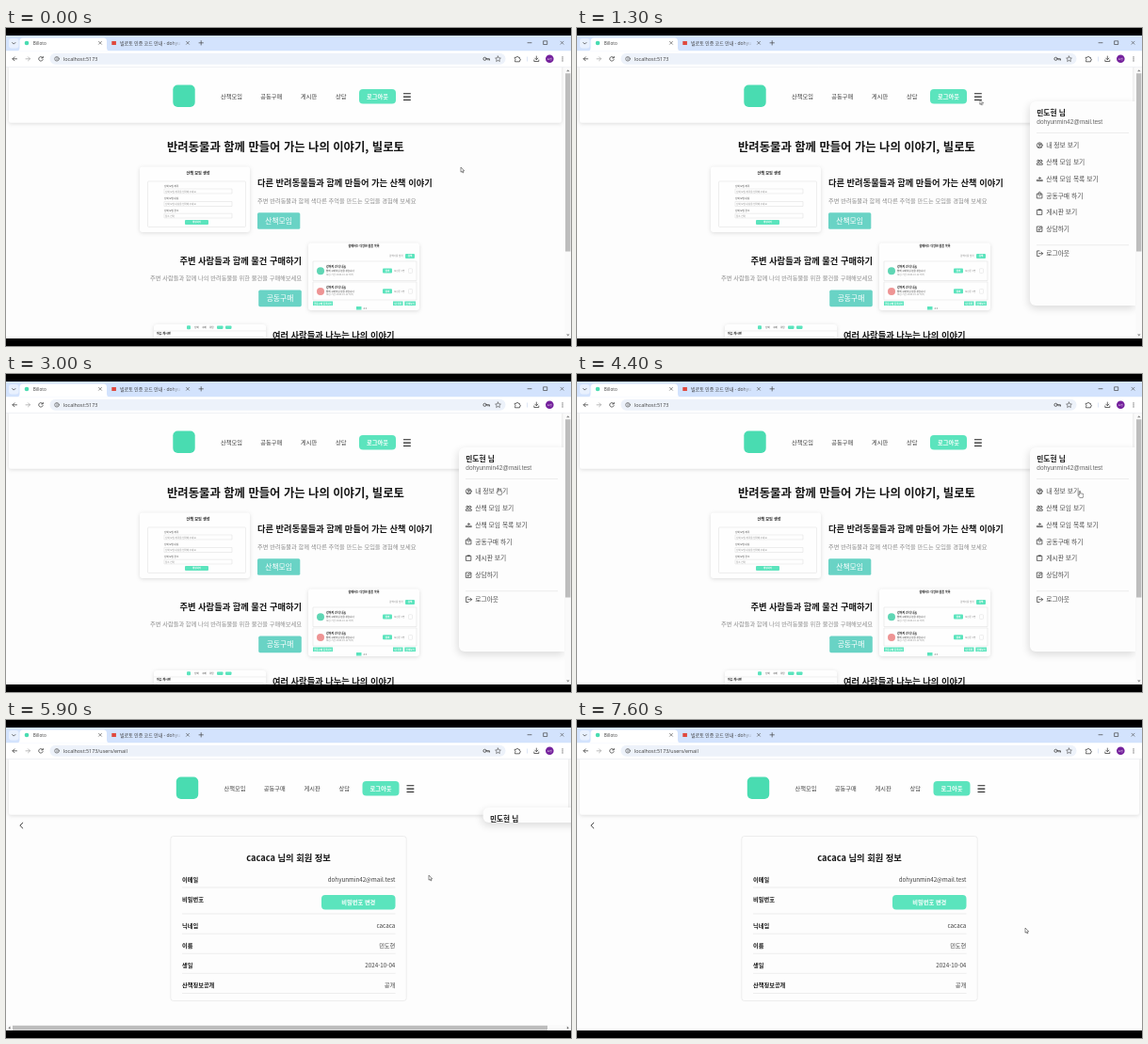
An HTML page that plays this animation: 600x338 px, repeating every 7700 ms.

```html
<!DOCTYPE html>
<html lang="ko">
<head>
<meta charset="utf-8">
<title>Billoto</title>
<style>
html, body { margin: 0; width: 100%; height: 100%; overflow: hidden; background: #000; }
#stage { position: absolute; left: 0; top: 0; width: 600px; height: 338px; overflow: hidden; background: #fdfdfd; }
svg { position: absolute; left: 0; top: 0; display: block; }
text { font: 6.22px 'Noto Sans CJK KR', 'Noto Sans CJK', sans-serif; fill: #3c3c3c; }
.b { font-weight: 700; fill: #151515; }
.h1 { font-size: 12.35px; }
.h2 { font-size: 9.25px; }
.sub { fill: #8c8c8c; }
.btn { font-size: 7.8px; fill: #fff; }
.white { fill: #fff; font-weight: 700; }
.mid { text-anchor: middle; }
.end { text-anchor: end; }
.ui, .ui text { font-family: 'Open Sans', 'Noto Sans CJK KR', sans-serif; font-size: 4.7px; }
.ui .url { font-size: 5.4px; }
.tiny text { font-size: 2.5px; }
.tiny .b { font-size: 3px; }
.line { fill: none; stroke: #444; stroke-width: .8; stroke-linecap: round; stroke-linejoin: round; }
.rule { fill: none; stroke: #e3e3e3; stroke-width: .6; }
.mint { fill: #5be4bd; }
.teal { fill: #69d3c5; }
.card { fill: #fefefe; filter: drop-shadow(0 1px 2px rgba(0,0,0,.13)); }

.home, .info, #dock, #menu, .hbar, .cursor, .arrow, .hand { animation: home 7.7s linear infinite; }
.info { animation-name: info; }
#dock { animation-name: dock; position: absolute; left: 480.8px; top: 78px; }
#menu { animation-name: menu; position: relative; width: 112.6px; height: 217px; overflow: hidden;
  background: #fdfdfd; border-radius: 6px 0 0 6px; box-shadow: -1px 3px 9px rgba(0,0,0,.14); }
#menu .item { font-size: 6.78px; fill: #4a4a4a; }
#menu .mail { font: 6.5px 'Liberation Sans', Arial, sans-serif; fill: #666; }
.hbar { animation-name: hbar; }
.cursor { animation-name: move; }
.arrow { animation-name: arrow; }
.hand { animation-name: hand; }

@keyframes home { 0%, 63.5% { opacity: 1 } 63.51%, 100% { opacity: 0 } }
@keyframes info { 0%, 63.5% { opacity: 0 } 63.51%, 100% { opacity: 1 } }
@keyframes dock { 0%, 63.5% { transform: none } 63.51%, 100% { transform: translateX(6.6px) } }
@keyframes menu {
  0%, 12.9% { opacity: 0; height: 8px; transform: translate(20px, 16px) }
  12.91% { opacity: 1; height: 8px; transform: translate(20px, 16px); animation-timing-function: ease-out }
  16.6%, 73.8% { opacity: 1; height: 217px; transform: none; animation-timing-function: ease-in-out }
  76.6% { opacity: 1; height: 16.5px; transform: translate(19px, 15px) }
  77.5% { opacity: 1; height: 6px; transform: translate(20px, 16px) }
  77.51%, 100% { opacity: 0; height: 6px; transform: translate(20px, 16px) }
}
@keyframes hbar {
  0%, 12.9% { opacity: 0 } 12.91%, 16.5% { opacity: 1 } 16.51%, 73.9% { opacity: 0 }
  73.91%, 77.8% { opacity: 1 } 77.81%, 100% { opacity: 0 }
}
@keyframes move {
  0% { transform: translate(483px, 148px); animation-timing-function: ease-in-out }
  11.5%, 20.5% { transform: translate(427.5px, 76px); animation-timing-function: ease-in-out }
  35%, 42% { transform: translate(523px, 121px); animation-timing-function: ease-in-out }
  54%, 58% { transform: translate(534px, 124px) }
  63%, 66% { transform: translate(531px, 124px); animation-timing-function: ease-in-out }
  72.5%, 79% { transform: translate(449px, 165px); animation-timing-function: ease-in-out }
  96%, 100% { transform: translate(476px, 221px) }
}
@keyframes arrow { 0%, 31% { opacity: 1 } 31.01%, 68.8% { opacity: 0 } 68.81%, 100% { opacity: 1 } }
@keyframes hand { 0%, 31% { opacity: 0 } 31.01%, 68.8% { opacity: 1 } 68.81%, 100% { opacity: 0 } }
</style>
</head>
<body>
<div id="stage">
<svg width="600" height="338">
  <defs>
    <linearGradient id="fade">
      <stop offset="0" stop-color="#d3e3fd" stop-opacity="0"/><stop offset="1" stop-color="#d3e3fd"/>
    </linearGradient>
    <g id="nav">
      <rect x="177.3" y="60.6" width="23.4" height="23.4" rx="5" fill="#49dcb1"/>
      <text x="228" y="75.4">산책모임</text>
      <text x="270.3" y="75.4">공동구매</text>
      <text x="313" y="75.4">게시판</text>
      <text x="350" y="75.4">상담</text>
      <rect class="mint" x="375" y="65" width="39" height="15.6" rx="4"/>
      <text class="white mid" x="394.5" y="75.1">로그아웃</text>
      <path d="M422 69.7h7.8M422 73.1h7.8M422 76.5h7.8" stroke="#222" stroke-width="1.1"/>
    </g>
    <g id="close"><path class="line" style="stroke-width:.6" d="M-1.5-1.5l3 3m0-3l-3 3"/></g>
  </defs>

  <g class="home">
    <rect class="card" x="3" y="38" width="587" height="62.8" rx="2"/>
    <use href="#nav"/>
    <text class="b h1" x="171" y="131.4">반려동물과 함께 만들어 가는 나의 이야기, 빌로토</text>

    <rect class="card" x="142" y="147.5" width="117" height="69.5" rx="3"/>
    <g class="tiny">
      <text class="b mid" x="204" y="156.2" style="font-size:4.1px">산책 모임 생성</text>
      <rect class="rule" x="150.5" y="163" width="104" height="48.5" rx="1"/>
      <text x="168" y="169">산책 모임 제목</text>
      <text x="168" y="182.3">산책 모임 내용</text>
      <text x="168" y="195.3">산책 모임 장소</text>
      <path class="rule" d="M168 171h72v5h-72zM168 184.5h72v5h-72zM168 197.2h72v4.8h-72z"/>
      <text class="sub" x="169" y="174.5">산책 모임 제목을 입력해 주세요</text>
      <text class="sub" x="169" y="188">산책 모임 내용을 입력해 주세요</text>
      <text class="sub" x="169" y="200.6">장소 선택</text>
      <rect class="mint" x="190" y="204" width="25" height="5" rx="1"/>
      <text class="white mid" x="202.5" y="207.4">생성하기</text>
    </g>
    <text class="b h2" x="267" y="168.4">다른 반려동물들과 함께 만들어 가는 산책 이야기</text>
    <text class="sub" x="267" y="186.2">주변 반려동물과 함께 색다른 추억을 만드는 모임을 경험해 보세요</text>
    <rect class="teal" x="267" y="196.2" width="45.3" height="17.6" rx="1.6"/>
    <text class="btn mid" x="289.6" y="207.9">산책모임</text>

    <text class="b h2 end" x="314" y="250.5">주변 사람들과 함께 물건 구매하기</text>
    <text class="sub end" x="314" y="268.4">주변 사람들과 함께 나의 반려동물을 위한 물건을 구매해보세요</text>
    <rect class="teal" x="268.2" y="278.6" width="45.6" height="17.6" rx="1.6"/>
    <text class="btn mid" x="291" y="290.3">공동구매</text>
    <rect class="card" x="321" y="228.5" width="118" height="71.5" rx="3"/>
    <g class="tiny">
      <text class="b mid" x="380" y="233.4">함께하는 다양한 물품 목록</text>
      <text class="sub end" x="421.500" y="243.400">검색어를 입력</text>
      <rect class="mint" x="424" y="240" width="10" height="5" rx="1"/>
      <text class="white mid" x="429" y="243.4">검색</text>
      <path class="rule" d="M326 248h110v20.5h-110zM326 270h110v19h-110z"/>
      <g id="row">
        <text class="b" x="340" y="255.4">강아지 간식 나눔</text>
        <text x="340" y="259.2">함께 구매하실 분을 찾습니다</text>
        <text class="sub" x="340" y="262.7">모집 기간 2024-10-12 까지</text>
        <rect class="mint" x="400" y="255.5" width="10" height="5" rx="1"/>
        <text class="white mid" x="405" y="258.9">참여</text>
        <text class="sub" x="412" y="259">모집중 3명</text>
        <rect class="rule" x="427.5" y="255.7" width="4" height="4.8" rx=".8"/>
      </g>
      <use href="#row" y="21.8"/>
      <circle cx="334" cy="258.3" r="4" fill="#5fd6b4"/>
      <circle cx="334" cy="280" r="4" fill="#ee9494"/>
      <path class="mint" d="M326 290.4h21v4.6h-21zM411 290.4h10.5v4.6H411zM423.3 290.4h11.7v4.6h-11.7zM372 296h5.5v3.4H372z"/>
      <text class="white mid" x="336.5" y="293.6">공동구매 등록하기</text>
      <text class="white mid" x="416.2" y="293.6">내 목록</text>
      <text class="white mid" x="429.2" y="293.6">전체보기</text>
      <text x="379.5" y="298.8">2  3</text>
    </g>

    <rect class="card" x="157" y="315" width="119" height="60" rx="3"/>
    <g class="tiny">
      <rect class="mint" x="192" y="316.3" width="4" height="4" rx="1"/>
      <text x="200" y="319.3">산책</text><text x="208" y="319.3">구매</text><text x="216" y="319.3">상담</text>
      <rect class="mint" x="224" y="316.5" width="6.5" height="3.4" rx=".8"/>
      <rect class="mint" x="233" y="316.5" width="6.5" height="3.4" rx=".8"/>
      <path class="rule" d="M157 322h119"/>
      <text class="b" x="160" y="326">자유 게시판</text>
      <rect class="rule" x="160" y="328.3" width="113" height="8"/>
    </g>
    <text class="b h2" x="283" y="330.3">여러 사람들과 나누는 나의 이야기</text>
  </g>

  <g class="info">
    <rect class="card" x="3" y="38" width="594" height="62.8" rx="2"/>
    <use href="#nav" x="3.5"/>
    <path class="line" d="M17.8 109.3l-3 2.9 3 2.9" style="stroke-width:1"/>
    <rect class="rule" x="174.8" y="123.5" width="250.4" height="175" rx="3"/>
    <text class="b h2 mid" x="300" y="149.9">cacaca 님의 회원 정보</text>
    <path class="rule" d="M187 178h226.5M187 206h226.5M187 227.2h226.5M187 248.3h226.5M187 269.3h226.5M187 290.5h226.5"/>
    <text class="b" x="187" y="172.2">이메일</text>
    <text class="b" x="187" y="193.1">비밀번호</text>
    <text class="b" x="187" y="220.9">닉네임</text>
    <text class="b" x="187" y="242">이름</text>
    <text class="b" x="187" y="263.1">생일</text>
    <text class="b" x="187" y="284.2">산책정보공개</text>
    <text class="end" x="413.3" y="172.2">dohyunmin42@mail.test</text>
    <rect class="mint" x="335" y="186" width="78.5" height="15.6" rx="4"/>
    <text class="white mid" x="374.3" y="196.1">비밀번호 변경</text>
    <text class="end" x="413.3" y="220.9">cacaca</text>
    <text class="end" x="413.3" y="242">민도현</text>
    <text class="end" x="413.3" y="263.1">2024-10-04</text>
    <text class="end" x="413.3" y="284.2">공개</text>
  </g>

  <g class="ui">
    <rect width="600" height="8"/>
    <rect y="8" width="600" height="16.5" fill="#d3e3fd"/>
    <rect x="3" y="11" width="10.5" height="10.5" rx="3" fill="#e9f1fe"/>
    <path class="line" d="M6.7 15.5l1.6 1.6 1.6-1.6"/>
    <path d="M11 24.5q3.5 0 3.5-3.5v-7q0-3.5 3.5-3.5h85.5q3.5 0 3.5 3.5v7q0 3.5 3.5 3.5z" fill="#fff"/>
    <circle cx="22" cy="16" r="2.3" fill="#49dcb1"/>
    <text x="28.8" y="17.7">Billoto</text>
    <use href="#close" x="100" y="15.8"/>
    <rect x="112.3" y="14" width="4.6" height="4" fill="#e0483e"/>
    <text x="121" y="17.7" style="font-size:5px">빌로토 인증 코드 안내 - dohyu</text>
    <rect x="175" y="11" width="12" height="11" fill="url(#fade)"/>
    <rect x="187" y="11" width="12" height="11" fill="#d3e3fd"/>
    <use href="#close" x="193" y="15.8"/>
    <path class="line" style="stroke-width:.7" d="M205 15.8h4.4M207.2 13.6v4.4M554 15.7h4M571 13.8h3.7v3.7H571z"/>
    <use href="#close" x="590.5" y="15.7"/>

    <rect y="24.5" width="600" height="17" fill="#fff"/>
    <path d="M0 41.500h600" stroke="#e6e9ee" stroke-width=".6"/>
    <rect x="46.5" y="26.8" width="484" height="12" rx="6" fill="#edf2fa"/>
    <path class="line" d="M11.5 32.8H7m2-2l-2 2 2 2M39 31.6a2.3 2.3 0 1 0 .2 2M39.3 30.3v1.6h-1.6"/>
    <path class="line" style="stroke:#aaa" d="M21 32.8h4.5m-2-2l2 2-2 2"/>
    <circle cx="54" cy="32.8" r="2.3" class="line" style="stroke-width:.6"/>
    <path class="line" style="stroke-width:.6" d="M54 32.6v1.3M54 31.5v.1"/>
    <text class="url" x="61" y="34.7">localhost:5173<tspan class="info">/users/email</tspan></text>
    <circle class="line" cx="508.5" cy="32.8" r="1.6"/>
    <path class="line" d="M510.2 32.8h3.3v1.3M512 33v1"/>
    <path class="line" style="stroke-width:.6" d="M522.5 30l.9 1.8 2 .3-1.5 1.4.4 2-1.8-1-1.8 1 .4-2-1.5-1.4 2-.3z"/>
    <path class="line" d="M540.5 31.3h1.5a1 1 0 0 1 2 0h1.4v1.4a1 1 0 0 1 0 2v1.1h-4.9v-1.3a1 1 0 0 0 0-1.8z"/>
    <path d="M553.5 30.5v5" stroke="#c8d6ee" stroke-width=".6"/>
    <path class="line" d="M563.3 30v3.6m-1.6-1.5l1.6 1.6 1.6-1.6M560.8 34v1.5h5V34"/>
    <circle cx="577.3" cy="32.8" r="4.3" fill="#74209c"/>
    <text class="mid" x="577.3" y="33.8" style="font-size:2.7px;fill:#fff">도현</text>
    <path d="M591 30.8v.1M591 32.8v.1M591 34.8v.1" class="line" style="stroke-width:1.1"/>
  </g>
</svg>

<div id="dock"><div id="menu">
  <svg width="113" height="217">
    <text class="b" x="7.3" y="14.7" style="font-size:7.7px">민도현 님</text>
    <text class="mail" x="7.3" y="24.2">dohyunmin42@mail.test</text>
    <path class="rule" d="M7 33.5h98M7 152.7h98"/>
    <g class="line" transform="translate(0 -.3)">
      <circle cx="10.3" cy="47" r="2.9"/><circle cx="10.3" cy="46.2" r="1"/><path d="M8.3 49q2-1.7 4 0"/>
      <circle cx="8.9" cy="63.6" r="1.1"/><circle cx="11.7" cy="63.6" r="1.1"/><path d="M7.3 67.2v-1q1.5-1.3 3 0 1.5-1.3 3 0v1z"/>
      <circle cx="10.3" cy="81.8" r=".8"/><path d="M7.3 84.5v-.6q1-.8 2 0 1-1.2 2 0 1-.8 2 0v.6z"/>
      <path d="M7.7 98.5h5.2v4.7H7.7zM9 98.5q0-2 1.3-2t1.3 2M9 100q1.3 1.7 2.6 0"/>
      <path d="M7.8 115.7h5v5h-5z"/><path d="M9.3 115.5h2" style="stroke-width:1.5"/>
      <path d="M7.7 133.3h5.2v5.4H7.7zM9.2 137l.2-1.2 2-2 1 1-2 2z"/>
      <path d="M10 159.2H7.6v5.6H10M9.5 162h4m-1.5-1.6l1.6 1.6-1.6 1.6"/>
    </g>
    <g transform="translate(17.2 0)">
      <text class="item" y="49.1">내 정보 보기</text>
      <text class="item" y="66.8">산책 모임 보기</text>
      <text class="item" y="84.7">산책 모임 목록 보기</text>
      <text class="item" y="102.5">공동구매 하기</text>
      <text class="item" y="120.3">게시판 보기</text>
      <text class="item" y="138.1">상담하기</text>
      <text class="item" y="164.1">로그아웃</text>
    </g>
  </svg>
</div></div>

<svg width="600" height="338">
  <g class="home">
    <rect x="593.3" y="41.8" width="6.7" height="289" fill="#fafafa"/>
    <rect x="594" y="48.2" width="5.400" height="189.3" fill="#bdbdbd"/>
    <path d="M595 46.2l1.8-2 1.8 2zM595 325.5l1.8 2 1.8-2z" fill="#888"/>
  </g>
  <g class="hbar">
    <rect y="324" width="600" height="7" fill="#fafafa"/>
    <rect x="7" y="324.8" width="568" height="4.8" fill="#bdbdbd"/>
    <path d="M4.500 325.400l-2 1.800 2 1.800zM595.800 325.400l2 1.800-2 1.800z" fill="#777"/>
  </g>
  <rect y="330" width="600" height="8"/>
  <g class="cursor" fill="#fff" stroke="#222" stroke-width=".5" stroke-linejoin="round">
    <path class="arrow" d="M0 0v5.2l1.2-1 .8 1.8.9-.4-.8-1.7h1.6z"/>
    <path class="hand" d="M-.6 4.5V.6q.6-1 1.2 0v2.5q.7-.5 1.1.1.7-.4 1.1.2.9-.3.9.6v1.7l-.7 2H.1L-2 5.2q-.2-1.2.8-.9z"/>
  </g>
</svg>
</div>
</body>
</html>
```
